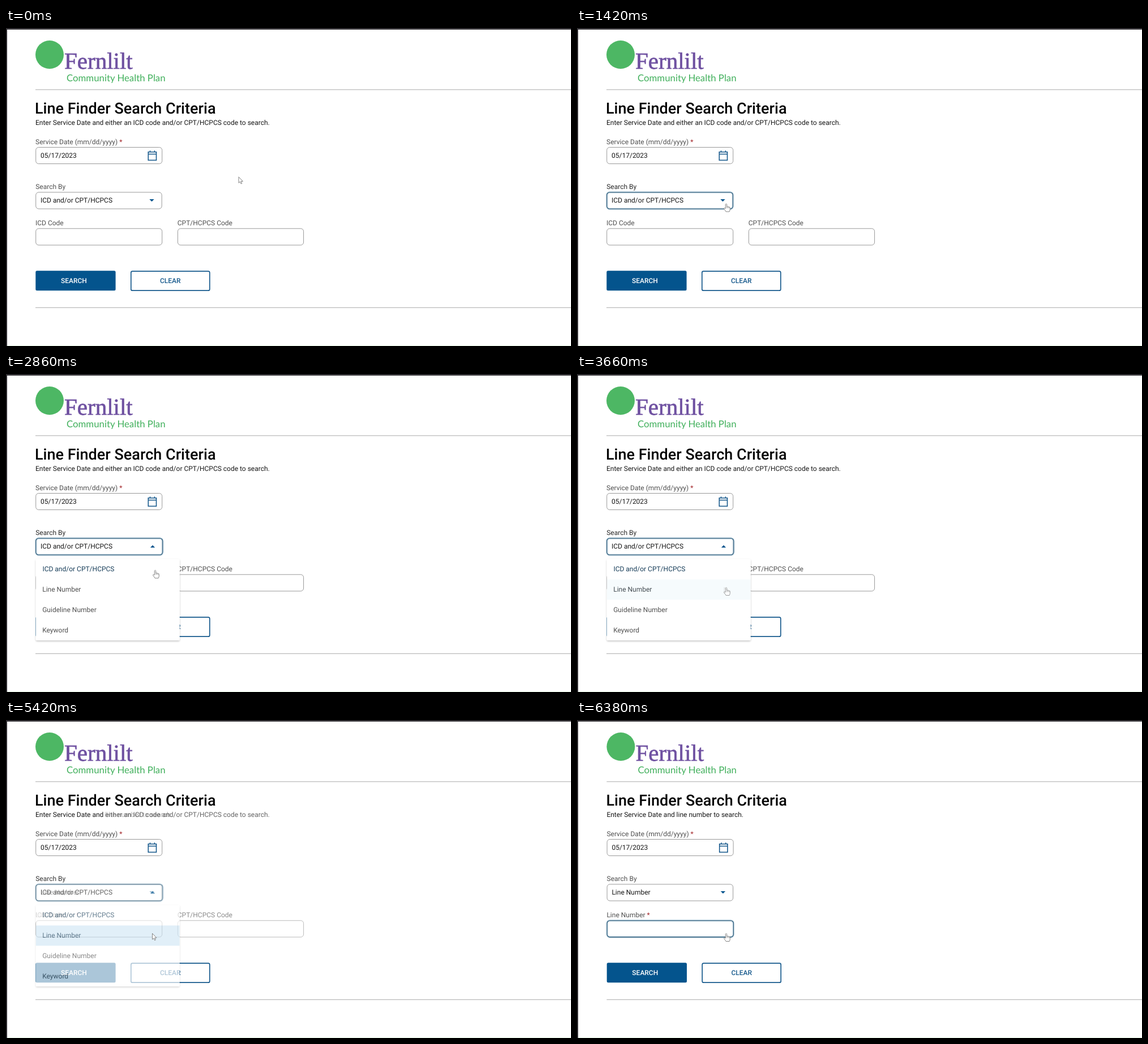
Recreate the animation shown at these times as an HTML page. Size 998 px wide and 561 px high, loop 8220 ms.

```html
<!DOCTYPE html>
<html lang="en">
<head>
<meta charset="utf-8">
<title>Line Finder</title>
<style>
html, body { margin: 0; width: 100%; height: 100%; overflow: hidden; background: #fff; }
svg { display: block; width: 100%; height: 100%; font: 12px Roboto, sans-serif; text-rendering: geometricPrecision; }
text { white-space: pre; }
.ink { fill: #161616; }
.label { fill: #505050; }
.navy { fill: #163c58; }
.must { fill: #a3262a; }
.medium { font-weight: 500; }
.field { fill: #fff; stroke: #999; }
.focus { fill: none; stroke: #2a5877; stroke-width: 1.3; }
.glow { fill: none; stroke: #dbe9f1; stroke-width: 4; }
.blue { fill: #04548d; }
.icon { fill: none; stroke: #17598c; stroke-width: 1.6; }
.rule { stroke: #ababab; }
.cursor { fill: #fff; stroke: #777; stroke-width: .9; stroke-linejoin: round; }
</style>
</head>
<body>
<svg viewBox="0 0 998 561">
  <defs>
    <filter id="soft" x="-10%" y="-10%" width="120%" height="120%">
      <feDropShadow dx="0" dy="1.5" stdDeviation="1.6" flood-opacity=".24"/>
    </filter>
  </defs>
  <rect width="998" height="561" fill="#fff"/>

  <g id="page">
    <circle cx="77" cy="47" r="25" fill="#4db764"/>
    <text x="103" y="72" font-family="Liberation Serif, serif" font-size="41" fill="#6f51a1" stroke="#6f51a1" stroke-width=".7">Fernlilt</text>
    <text x="107" y="93.5" font-family="Lato, sans-serif" font-size="16.8" fill="#41b05c">Community Health Plan</text>
    <path class="rule" d="M52 108.8H1000M52 493.3H1000"/>

    <text class="medium" x="51" y="151" font-size="27" fill="#050505">Line Finder Search Criteria</text>
    <text class="ink" x="52" y="171">Enter Service Date and</text>
    <text class="ink old" x="175.2" y="171">either an ICD code and/or CPT/HCPCS code to search.</text>
    <text class="ink new" x="175.2" y="171">line number to search.</text>

    <text class="label" x="52" y="205">Service Date (mm/dd/yyyy) <tspan class="must">*</tspan></text>
    <rect class="field" x="52.7" y="210.5" width="223" height="29" rx="5"/>
    <text class="ink" x="61" y="229">05/17/2023</text>
    <path class="icon" d="M251.3 218.8H265.5V233.2H251.3ZM251.3 222.5H265.5M254.5 216.3V219M262.4 216.3V219"/>

    <text id="searchBy" x="52.2" y="284.3">Search By</text>
    <rect class="field" x="52.7" y="289.8" width="222.5" height="29.2" rx="5"/>
    <g id="selectFocus">
      <rect id="selectGlow" class="glow" x="52.7" y="289.8" width="223" height="29.4" rx="5"/>
      <rect id="selectRing" class="focus" x="52.7" y="289.8" width="223" height="29.4" rx="5"/>
    </g>
    <text class="ink old" x="61" y="308.2">ICD and/or CPT/HCPCS</text>
    <text class="ink new" x="61" y="308.2">Line Number</text>
    <path id="down" class="blue" d="M253.3 302H261.7L257.5 306.2Z"/>
    <path id="up" class="blue" d="M254.8 306.2H263.2L259 302Z"/>

    <text class="label old" x="52" y="348.3">ICD Code</text>
    <text class="label new" x="52" y="348.3">Line Number <tspan class="must">*</tspan></text>
    <rect class="field" x="52.7" y="353.8" width="223" height="29.2" rx="5"/>
    <g id="inputFocus">
      <rect class="glow" x="52.7" y="353.8" width="223.3" height="29.2" rx="5"/>
      <rect class="focus" x="52.7" y="353.8" width="223.3" height="29.2" rx="5"/>
    </g>
    <g class="old">
      <text class="label" x="302.8" y="348.3">CPT/HCPCS Code</text>
      <rect class="field" x="303.4" y="353.8" width="222.2" height="29.2" rx="5"/>
    </g>

    <rect class="blue" x="52.3" y="428.3" width="141.3" height="35" rx="2.5"/>
    <text class="medium" x="119.9" y="449.8" fill="#fff" text-anchor="middle">SEARCH</text>
    <rect x="220.8" y="429.2" width="139" height="34" rx="2.5" fill="#fff" stroke="#175a8d" stroke-width="1.7"/>
    <text class="medium" x="290.3" y="450" fill="#175a8d" text-anchor="middle">CLEAR</text>

    <g id="menu">
      <rect x="52.7" y="326.5" width="254" height="143.5" rx="2" fill="#fff" filter="url(#soft)"/>
      <rect id="hover" x="52.7" y="362.5" width="254" height="35.7" fill="#d3e8f6"/>
      <text class="navy" x="64.4" y="348.3">ICD and/or CPT/HCPCS</text>
      <text id="choice" x="64.2" y="384.3">Line Number</text>
      <text class="label" x="64.2" y="420.2">Guideline Number</text>
      <text class="label" x="64.2" y="456.1">Keyword</text>
    </g>
  </g>

  <path id="arrow" class="cursor" d="M0 0V10.6L2.4 8.4L4.1 12.2L5.8 11.4L4.2 7.8H7.4Z"/>
  <g id="hand" class="cursor">
    <path d="M-1.2 8.6V1Q0-1 1.2 1V5Q2.4 4.2 3.2 5.3Q4.6 4.6 5.2 5.9Q6.8 5.5 6.8 7.4V10Q6.8 12 5.6 14H-.4Q-1.4 12-3.6 9.4Q-4.4 7.8-3 7.6Q-2 7.6-1.2 8.6Z"/>
    <path d="M1.2 5V8M3.2 5.6V8M5.2 6.2V8.2" stroke-width=".7"/>
  </g>

  <path d="M0 0H998V2.7H2V561H0Z" fill="#2d2b2f"/>
  <rect x="2" y="560" width="996" height="1" fill="#e6f6e3"/>
</svg>
<script>
const LOOP = 8220;
const $ = id => document.getElementById(id);
const oldParts = document.querySelectorAll('.old');
const newParts = document.querySelectorAll('.new');

const ramp = (t, from, to) => Math.min(1, Math.max(0, (t - from) / (to - from)));
const mix = (a, b, p) => a + (b - a) * p;
const easeInOut = p => p * p * (3 - 2 * p);
const easeOut = p => 1 - (1 - p) ** 3;
const fade = (el, p) => el.setAttribute('opacity', p.toFixed(3));
const move = (el, x, y) => el.setAttribute('transform', `translate(${x.toFixed(2)} ${y.toFixed(2)})`);
const tint = (el, r, g, b, p) => el.setAttribute('fill', `rgb(${mix(80, r, p)},${mix(80, g, p)},${mix(80, b, p)})`);

function draw(t) {
  const focus = ramp(t, 1140, 1420);
  const open = ramp(t, 1820, 2420);
  const hover = ramp(t, 3540, 4140);
  const swap = ramp(t, 5220, 5820);
  const finish = ramp(t, 5820, 6300);
  const shown = open * (1 - swap);
  const active = focus * (1 - swap);

  oldParts.forEach(el => fade(el, 1 - swap));
  newParts.forEach(el => fade(el, swap));
  fade($('selectFocus'), active);
  fade($('inputFocus'), finish);
  fade($('menu'), shown);
  fade($('up'), shown);
  fade($('down'), 1 - shown);
  fade($('hover'), hover);

  const width = mix(222.7, 224, open);
  for (const id of ['selectGlow', 'selectRing']) $(id).setAttribute('width', width);
  tint($('choice'), 22, 60, 88, hover);
  tint($('searchBy'), 40, 40, 40, active);
  move($('page'), .4 * finish, 0);

  // The pointer turns into a hand over the select, back over the list, and again over the input.
  const reach = easeInOut(ramp(t, 260, 1060));
  const drop = easeOut(ramp(t, 2700, 3400));
  const y = mix(mix(262.7, 310, reach), 376.5, drop);
  const drift = ramp(t, 4860, 5420);
  const arrowX = t < 2700 ? mix(411, 263, reach) : mix(260, 258.5, drift);
  const grip = t < 3000 ? ramp(t, 1020, 1140) : t < 5000 ? 1 - hover : ramp(t, 5700, 5960);
  move($('arrow'), arrowX, y);
  move($('hand'), 263.5, y);
  fade($('arrow'), 1 - grip);
  fade($('hand'), grip);
}

const start = performance.now();
function tick() {
  draw((performance.now() - start) % LOOP);
  requestAnimationFrame(tick);
}
draw(0);
requestAnimationFrame(tick);
</script>
</body>
</html>
```
